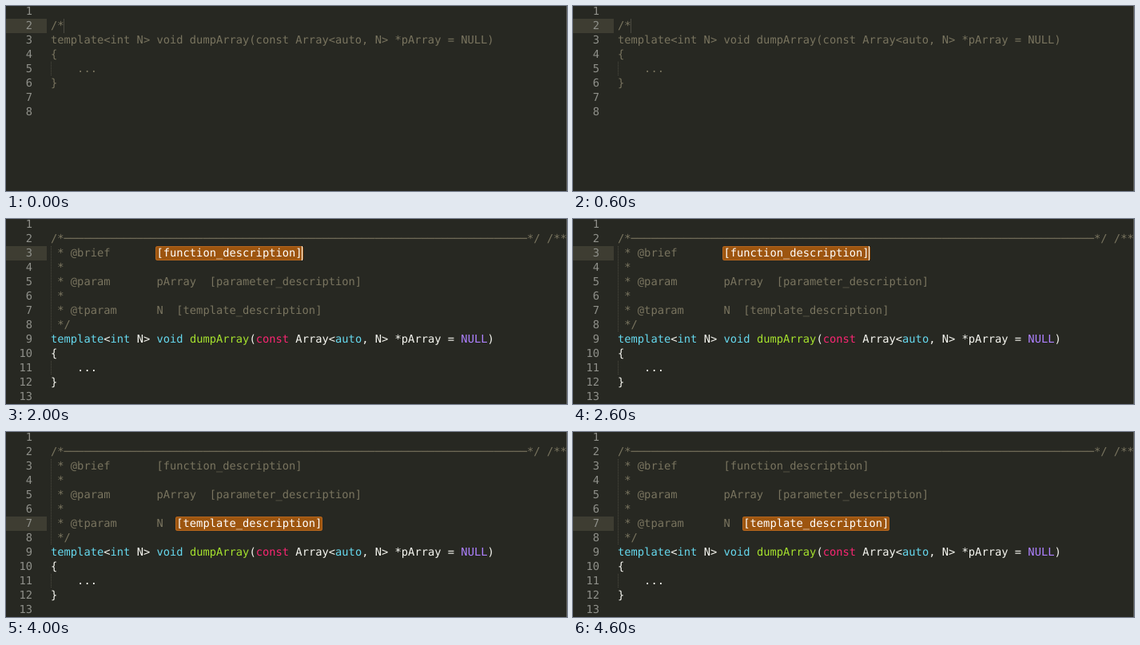
Recreate the animation shown at these times as an HTML page. Size 702 px wide and 232 px high, loop 5 s.

```html
<!DOCTYPE html>
<html lang="en">
<head>
<meta charset="utf-8">
<title>Doc comment completion</title>
<style>
  html, body { margin: 0; width: 100%; height: 100%; overflow: hidden; background: #272822; }
  .stage {
    position: relative; width: 702px; height: 232px; overflow: hidden;
    background: #272822; color: #f8f8f2;
    font: 13.75px/18px "DejaVu Sans Mono", monospace;
    font-variant-ligatures: none;
    text-rendering: geometricPrecision;
  }
  .stage * { position: absolute; margin: 0; font: inherit; white-space: pre; }
  .stage pre span { position: static; }
  .scene { inset: 0; }
  .nums { left: 0; top: -2px; width: 33px; text-align: right; color: #8f908a; }
  .code { left: 56px; top: -2px; }
  .dim { color: #79745f; }
  .type { color: #66d9ef; }
  .func { color: #a6e22e; }
  .key { color: #f92672; }
  .const { color: #ae81ff; }

  /* --row counts lines from 1, --col counts characters from 0 */
  .bar, .pick, .caret, .guide { top: calc(var(--row) * 18px - 20px); height: 18px; }
  .bar { left: 0; width: 51px; background: #3e3d32; }
  .guide {
    left: 56px; width: 1px; height: calc(var(--rows, 1) * 18px);
    background: repeating-linear-gradient(#4b4a40 0 1px, transparent 1px 2px);
  }
  .pick {
    left: calc(55px + var(--col) * 1ch); padding: 0 1px;
    color: #fff; background: #9d550f; border-radius: 3px;
    box-shadow: inset 0 0 0 1px #b5651d;
  }
  .caret { width: 1px; background: #4b4a40; }
  .caret.lit { left: 370px; background: #f8f8f0; }
  .fold { left: 36px; top: 20px; width: 10px; height: 9px; background: #a3a49e; clip-path: polygon(0 0, 100% 0, 50% 100%); }
  .edge { right: 0; top: 0; width: 1px; height: 100%; background: #5a5b56; }

  /* --at is the second a part appears */
  .one, .two, .three { animation: one 5s step-end calc((var(--at) - 5) * 1s) infinite; }
  .two { animation-name: two; }
  .three { animation-name: three; }
  @keyframes one { 0% { visibility: visible } 20%, 100% { visibility: hidden } }
  @keyframes two { 0% { visibility: visible } 40%, 100% { visibility: hidden } }
  @keyframes three { 0% { visibility: visible } 60%, 100% { visibility: hidden } }
</style>
</head>
<body>
<div class="stage">
  <div class="scene two" style="--at: 0">
    <div class="bar" style="--row: 2"></div>
    <div class="guide" style="--row: 5"></div>
    <pre class="nums">1
2
3
4
5
6
7
8</pre>
    <pre class="code dim">
&#8203;
/*
template&lt;int N> void dumpArray(const Array&lt;auto, N> *pArray = NULL)
{
    ...
}</pre>
  </div>
  <div class="caret one" style="--at: 0; --row: 2; left: 72px"></div>
  <div class="scene one" style="--at: 1">
    <pre class="code dim" style="top: 16px">  *</pre>
    <div class="caret" style="--row: 2; left: 80px"></div>
  </div>

  <div class="bar one" style="--at: 2; --row: 3"></div>
  <div class="bar one" style="--at: 3; --row: 5"></div>
  <div class="bar one" style="--at: 4; --row: 7"></div>
  <div class="scene three" style="--at: 2">
    <div class="guide" style="--row: 3; --rows: 6"></div>
    <div class="guide" style="--row: 11"></div>
    <pre class="nums">1
2
3
4
5
6
7
8
9
10
11
12
13</pre>
    <pre class="code"><span class="dim">&#8203;
/*──────────────────────────────────────────────────────────────────────*/ /**
 * @brief       [function_description]
 *
 * @param       pArray  [parameter_description]
 *
 * @tparam      N  [template_description]
 */</span>
<span class="type">template</span>&lt;<span class="type">int</span> N> <span class="type">void</span> <span class="func">dumpArray</span>(<span class="key">const</span> Array&lt;<span class="type">auto</span>, N> *pArray = <span class="const">NULL</span>)
{
    ...
}</pre>
  </div>
  <div class="pick one" style="--at: 2; --row: 3; --col: 16">[function_description]</div>
  <div class="caret lit one" style="--at: 2; --row: 3"></div>
  <div class="fold one" style="--at: 3"></div>
  <div class="pick one" style="--at: 3; --row: 5; --col: 24">[parameter_description]</div>
  <div class="pick one" style="--at: 4; --row: 7; --col: 19">[template_description]</div>

  <div class="edge"></div>
</div>
</body>
</html>
```
